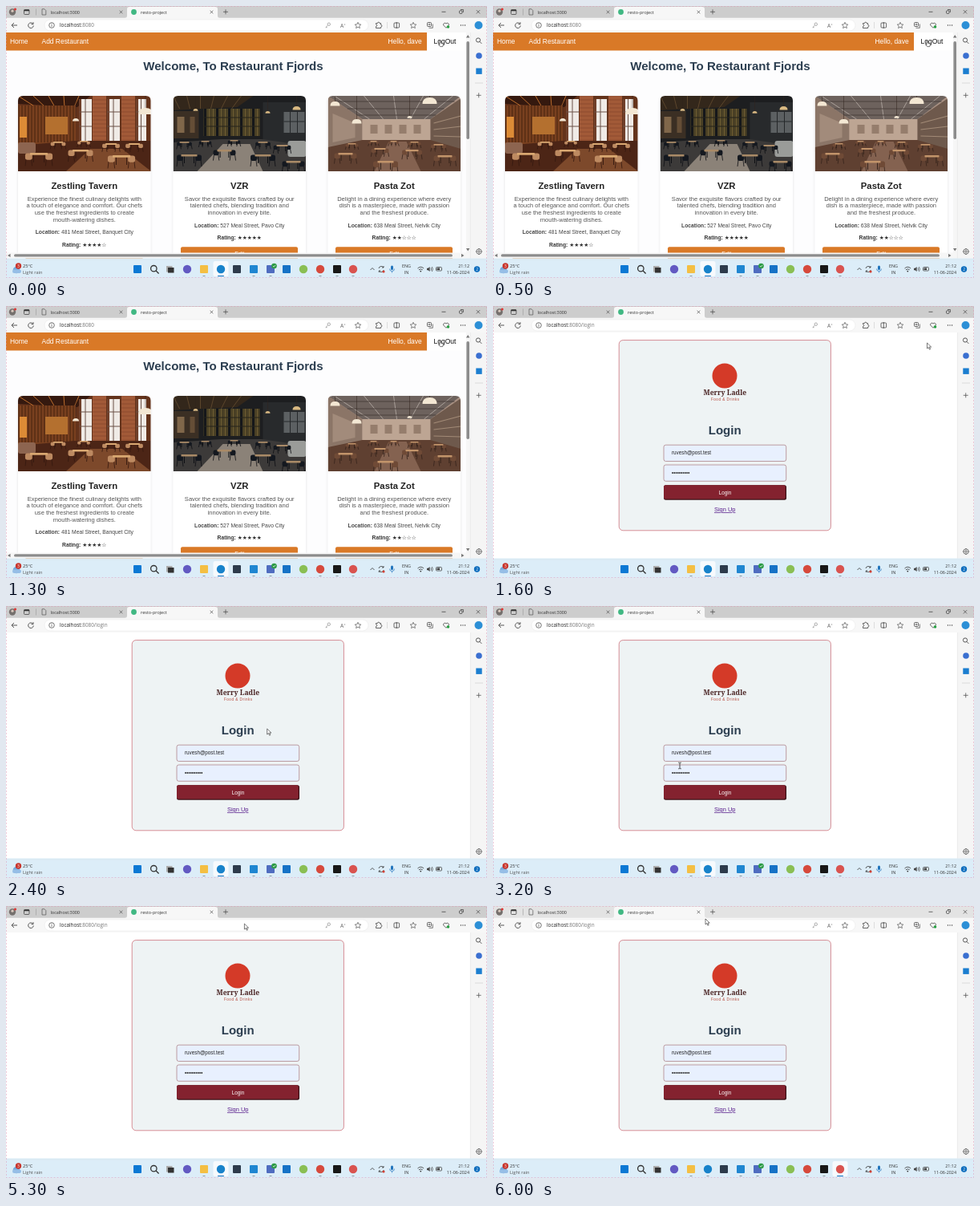
These frames come from a looping animation (600 by 339 pixels, 6.1 s). An HTML page:

```html
<!DOCTYPE html>
<html lang="en">
<head>
<meta charset="utf-8">
<title>resto-project</title>
<style>
html, body { margin: 0; width: 100%; height: 100%; overflow: hidden; background: #fff; }
svg { display: block; width: 600px; height: 339px; }
text { font-family: "Liberation Sans", Arial, sans-serif; white-space: pre; }
.ui text { font-family: "Open Sans", "Noto Sans", sans-serif; }
.star { font-family: "DejaVu Sans", sans-serif; }
.serif { font-family: "Noto Serif", serif !important; }
</style>
</head>
<body>
<svg id="stage" viewBox="0 0 600 339"></svg>
<script>
const LOOP = 6100, LOGOUT = 1500, BLUR = 5800;

const rect = (x, y, w, h, fill, more = '') => `<rect x="${x}" y="${y}" width="${w}" height="${h}" fill="${fill}" ${more}/>`;
const circle = (x, y, r, fill, more = '') => `<circle cx="${x}" cy="${y}" r="${r}" fill="${fill}" ${more}/>`;
const line = (d, color = '#444', w = 0.8, more = '') => `<path d="${d}" fill="none" stroke="${color}" stroke-width="${w}" ${more}/>`;
const shape = (d, fill, more = '') => `<path d="${d}" fill="${fill}" ${more}/>`;
const text = (x, y, size, str, fill = '#333', more = '') => `<text x="${x}" y="${y}" font-size="${size}" fill="${fill}" ${more}>${str}</text>`;
const group = (body, more = '') => `<g ${more}>${body}</g>`;
const each = (list, fn) => list.map(fn).join('');
const range = n => [...Array(n).keys()];
const MID = 'text-anchor="middle" ', BOLD = 'font-weight="700" ', END = 'text-anchor="end"';

// Tables at [x, y, size], each with a chair on both sides
const tables = (spots, top, seat, leg) => each(spots, ([x, y, s]) =>
  line(`M${x - s * 0.6} ${y}v${s}M${x + s * 0.6} ${y}v${s}`, leg, 1)
  + each([-1.15, 1.15], k => line(`M${x + k * s - s * 0.3} ${y + s * 0.6}l-1 ${s * 0.8}M${x + k * s + s * 0.3} ${y + s * 0.6}l1 ${s * 0.8}`, leg, 0.8)
    + rect(x + k * s - s * 0.4, y - s * 0.05, s * 0.8, s * 0.75, seat, `rx="${s * 0.25}"`))
  + rect(x - s, y - 1, s * 2, s * 0.2 + 0.6, top, 'rx=".6"'));

const lamp = (x, y, w, fill = '#f3e7d3') =>
  line(`M${x} 0V${y}`, '#30231c', 0.5) + shape(`M${x - w} ${y + w * 0.9}Q${x - w} ${y} ${x} ${y}T${x + w} ${y + w * 0.9}z`, fill);

const bistro = rect(0, 0, 166, 94, '#64331b')
  + shape('M0 0H90L74 14L0 10z', '#35190f')
  + each(range(5), i => line(`M${i * 19} 0L${22 + i * 12} 14`, '#bd6d2c', 1))
  + rect(0, 12, 72, 48, '#79401f')
  + each(range(18), i => line(`M${1 + i * 4} 12v46`, '#47220f', 1))
  + rect(2, 26, 9, 26, '#dc8b36') + rect(34, 26, 28, 22, '#b4702f')
  + each([[76, 16], [111, 16], [147, 13]], ([x, w]) => rect(x, 4, w, 56, '#f0ebe6')
    + rect(x, 4, 3, 58, '#70402a') + line(`M${x + w / 2} 4v56M${x} 20h${w}M${x} 38h${w}`, '#6a5146', 1))
  + each([[93, 17], [129, 17]], ([x, w]) => rect(x, 0, w, 62, '#a25a38')
    + each(range(12), i => line(`M${x} ${i * 5}h${w}`, '#7d4229', 0.6)))
  + shape('M0 62L70 56H166V94H0z', '#4c2516') + shape('M60 94L90 66H130L166 94z', '#7d492b')
  + rect(0, 58, 22, 14, '#8d6550', 'rx="3"')
  + tables([[50, 58, 6], [82, 57, 5], [116, 60, 7], [145, 60, 7], [26, 72, 11], [78, 68, 10], [129, 75, 11]], '#d9a871', '#bd8a61', '#341910')
  + lamp(159, 15, 9) + lamp(72, 28, 4);

const lounge = rect(0, 0, 166, 94, '#1d1e20')
  + shape('M0 0H100L80 14L0 18z', '#33271b')
  + each(range(6), i => line(`M${i * 17} 0L${8 + i * 13} 16`, '#6e5433', 0.7))
  + rect(0, 19, 32, 34, '#3b2f24') + rect(5, 26, 9, 20, '#80674a') + rect(21, 26, 6, 20, '#654e36')
  + rect(38, 16, 70, 34, '#4a4025')
  + each(range(14), i => line(`M${40 + i * 5} 16v34`, i % 3 ? '#796638' : '#15171a', i % 3 ? 0.8 : 3))
  + line('M38 27h70M38 38h70', '#25231b', 1)
  + rect(112, 8, 54, 50, '#282a2c') + rect(138, 20, 26, 26, '#5c6062') + line('M146 20v26M155 20v26M138 32h26', '#25282a', 1)
  + shape('M0 58L60 54H110L166 62V94H0z', '#3c3a39') + shape('M30 94L62 60H96L112 94z', '#8b8278')
  + rect(143, 56, 23, 20, '#9a9c99', 'rx="3"')
  + tables([[14, 58, 6], [40, 57, 5], [76, 56, 5], [112, 58, 6], [136, 62, 7], [20, 74, 10], [64, 68, 9], [112, 74, 10], [150, 82, 9]], '#a98a67', '#14181f', '#0d0f13')
  + lamp(154, 13, 5, '#d9b982') + lamp(118, 19, 3, '#d9b982') + lamp(28, 16, 3, '#d9b982');

const loft = rect(0, 0, 166, 94, '#a99183')
  + shape('M0 0H166L128 29H43z', '#6d625d')
  + each(range(5), i => line(`M${8 + i * 37} 0L${52 + i * 17} 29`, '#aaa099', 1))
  + line('M8 7H158M24 16H145M35 24H135', '#4a413d', 1)
  + shape('M0 0L43 29V58L0 70z', '#8b7567') + shape('M6 22L34 34V52L6 58z', '#a28b7b')
  + rect(43, 29, 85, 29, '#bda593')
  + shape('M166 3L128 29V58L166 72z', '#6e594c')
  + each(range(3), i => line(`M132 ${34 + i * 8}L166 ${25 + i * 13}`, '#a28a76', 1.2))
  + each(range(4), i => rect(53 + i * 18, 36, 9, 11, '#957d6c'))
  + shape('M0 64L43 55H128L166 66V94H0z', '#5f4031') + shape('M58 94L76 57H98L116 94z', '#846250')
  + tables([[30, 60, 5], [57, 57, 4], [82, 57, 4], [108, 58, 5], [138, 61, 6], [22, 72, 9], [65, 66, 7], [105, 68, 8], [146, 75, 9], [72, 82, 10]], '#c2946a', '#6f4a36', '#35231b')
  + lamp(9, 7, 6) + lamp(36, 29, 6) + lamp(127, 2, 9) + lamp(102, 25, 3);

const cards = [
  { x: 15, name: 'Zestling Tavern', photo: bistro, stars: '★★★★☆', place: '481 Meal Street, Banquet City',
    lines: ['Experience the finest culinary delights with', 'a touch of elegance and comfort. Our chefs', 'use the freshest ingredients to create', 'mouth-watering dishes.'] },
  { x: 208.5, name: 'VZR', photo: lounge, stars: '★★★★★', place: '527 Meal Street, Pavo City',
    lines: ['Savor the exquisite flavors crafted by our', 'talented chefs, blending tradition and', 'innovation in every bite.'] },
  { x: 401.5, name: 'Pasta Zot', photo: loft, stars: '★★☆☆☆', place: '638 Meal Street, Nelvik City',
    lines: ['Delight in a dining experience where every', 'dish is a masterpiece, made with passion', 'and the freshest produce.'] },
];

function card({ x, name, photo, stars, place, lines }) {
  const cx = x + 82.75, end = 242.6 + lines.length * 8.65;
  return rect(x, 112, 165.5, 220, '#fff', 'rx="6" filter="url(#shadow)"')
    + group(group(photo, 'filter="url(#soft)"'), `transform="translate(${x} 112)" clip-path="url(#photo)"`)
    + text(cx, 227.7, 11.3, name, '#222', MID + BOLD)
    + each(lines, (s, i) => text(cx, 242.6 + i * 8.65, 7.55, s, '#555', MID))
    + text(cx, end + 7, 6.74, `<tspan ${BOLD}>Location:</tspan> ${place}`, '#444', MID)
    + text(cx, end + 22.6, 6.74, `<tspan ${BOLD}>Rating:</tspan> <tspan class="star">${stars}</tspan>`, '#333', MID)
    + rect(x + 9.5, end + 31.8, 146, 16, '#d97927', 'rx="2"')
    + text(cx, end + 42.5, 7, 'Edit', '#fff', MID);
}

const home = rect(0, 33, 579, 283, '#fdfdfe')
  + text(283.5, 79.7, 15.05, 'Welcome, To Restaurant Fjords', '#2c3e50', MID + BOLD)
  + each(cards, card)
  + rect(0, 33, 525, 22.5, '#d97927') + rect(525, 33, 49, 22.5, '#fff')
  + text(5, 47.2, 8.45, 'Home', '#fff') + text(44.5, 47.2, 8.45, 'Add Restaurant', '#fff')
  + text(476.5, 47.2, 8.45, 'Hello, dave', '#fff') + text(533.5, 47.2, 8.5, 'LogOut', '#111')
  + rect(574, 33, 5, 283, '#f6f6f6') + rect(574.4, 44, 3.6, 122, '#8c8c8c', 'rx="1.8"')
  + rect(0, 307.5, 579, 7, '#f6f6f6') + rect(10, 309.2, 547, 3.4, '#8c8c8c', 'rx="1.7"')
  + shape('M574 39.5l2.2-3.5 2.2 3.5zM5.5 308.7v4.4l-3.5-2.2zM568 308.7v4.4l3.5-2.2zM574 302h4.4l-2.2 3.5z', '#777');

const field = y => rect(213, y, 152.7, 20.3, '#e8f0fe', 'rx="2.5" stroke="#a8777b" stroke-width=".7"');
const login = rect(0, 33, 579, 283, '#fff')
  + rect(157.2, 42.6, 264.2, 237.2, '#eef3f4', 'rx="5" stroke="#c9606c" stroke-width=".7"')
  + circle(289, 87, 15.5, '#d43a28')
  + text(289.3, 111.3, 8.6, 'Merry Ladle', '#4a2424', MID + BOLD + 'class="serif"')
  + text(289.8, 117.8, 4.6, 'Food &amp; Drinks', '#b5493c', MID + 'letter-spacing=".5"')
  + text(289.2, 159.6, 15, 'Login', '#2c3e50', MID + BOLD)
  + field(173.2) + field(198)
  + text(223, 185.3, 6.3, 'ruvesh@post.test', '#222')
  + each(range(10), i => circle(224 + i * 2.25, 208, 0.9, '#222'))
  + rect(213, 223.3, 153, 18.4, '#3c1017', 'rx="2.5"') + rect(213, 223.3, 151.8, 17.2, '#84222f', 'rx="2.2"')
  + text(289.5, 234.8, 6.3, 'Login', '#fff', MID)
  + text(289.2, 256.3, 7.45, 'Sign Up', '#551a8b', MID + 'text-decoration="underline"');

const cross = (x, y, r = 1.8) => line(`M${x - r} ${y - r}l${2 * r} ${2 * r}m0 ${-2 * r}l${-2 * r} ${2 * r}`, '#444', 0.7);
const plus = (x, y) => line(`M${x - 3} ${y}h6m-3-3v6`, '#444', 0.7);
const ring = (x, y, r) => circle(x, y, r, 'none', 'stroke="#555" stroke-width=".8"');
const box = (x, y, w, h) => rect(x, y, w, h, 'none', 'rx="1" stroke="#444" stroke-width=".8"');
const star = (x, y) => line(`M${x} ${y - 3.7}l1.1 2.5 2.7.3-2 1.8.6 2.7-2.4-1.4-2.4 1.4.6-2.7-2-1.8 2.7-.3z`, '#555', 0.7);
const magnifier = (x, y, r, w = 1) => circle(x, y, r, 'none', `stroke="#333" stroke-width="${w}"`) + line(`M${x + r * 0.7} ${y + r * 0.7}l${r} ${r}`, '#333', w);
const page = line('M45 3.8h3l1.8 1.8v5.4H45z', '#555', 0.7);

const chrome = rect(0, 0, 600, 15.5, '#cdcdcd', 'id="tabs"')
  + rect(0, 14.8, 600, 18.2, '#f7f7f7')
  + shape('M148 15Q151 15 151 12V4Q151 1 154 1H261Q264 1 264 4V12Q264 15 267 15z', '#f7f7f7')
  + circle(8, 7.5, 4.2, '#75706d') + circle(8, 6.2, 1.6, '#d8c8bd') + circle(11.5, 4, 1.6, '#d93a3a')
  + box(22.5, 4.5, 6.5, 6) + line('M22.5 5.5h6.5', '#333', 1.6) + line('M37.5 3.5v8', '#999', 0.6)
  + page + text(55.5, 9.6, 5.42, 'localhost:3000') + cross(143.5, 7.5)
  + circle(159.5, 7.5, 3.4, '#41b883') + text(168, 9.6, 5.5, 'resto-project') + cross(256.5, 7.5) + plus(274, 7.3)
  + line('M543.5 7.3h5', '#333', 0.7) + box(565.5, 5.8, 3.6, 3.6) + line('M567 4.5h3.4v3.4', '#333', 0.7) + cross(589, 7.3, 2.2)
  + line('M14 24H7m3-3l-3 3 3 3M33.7 22.3a3.3 3.3 0 1 0 .6 2.2M34 20.2v2.5h-2.5', '#444', 0.9)
  + rect(48, 17, 404, 14, '#fff', 'rx="7" stroke="#e4e4e4" stroke-width=".5"')
  + ring(57, 24, 3.3) + line('M57 23.4v2.3M57 21.8v.8', '#555', 0.8)
  + text(67, 26.3, 6.35, 'localhost<tspan fill="#777">:8080<tspan id="path"></tspan></tspan>', '#222')
  + circle(402.8, 22.7, 1.7, 'none', 'stroke="#888" stroke-width=".7"') + line('M401.5 24l-2.7 2.7h1.8', '#888', 0.7)
  + text(417, 26.6, 6.6, 'A', '#666') + text(421.5, 23.5, 4, '»', '#666') + star(439, 24)
  + line('M461.5 21.5h2a1.3 1.3 0 0 1 2.6 0h1.5v2a1.3 1.3 0 0 1 0 2.6v1.4h-6.1v-2a1.3 1.3 0 0 0 0-2.6z', '#444')
  + line('M475.5 20v8', '#ccc', 0.6)
  + box(484, 21, 6.6, 6) + line('M487.3 20v8') + star(508, 24)
  + box(525.5, 20.5, 5, 5) + line('M527.5 27.3h4.8v-4.8M528 21.7v2.6m-1.3-1.3h2.6', '#444', 0.7)
  + line('M549 27.3l-3-3a1.8 1.8 0 0 1 3-2.3 1.8 1.8 0 0 1 3 2.3z', '#444') + circle(551.5, 26, 1.8, '#27a243')
  + each([567.4, 570, 572.6], x => circle(x, 24, 0.65, '#333'));

const sidebar = rect(579, 33, 21, 283, '#f5f5f5') + line('M579.3 33V316', '#e2e2e2', 0.6)
  + circle(589.5, 24, 5, '#2c8fd6')
  + magnifier(589, 42.5, 2.6, 0.8) + circle(590, 62, 3.8, '#3a6fd0') + rect(586.3, 77.5, 7.4, 7.4, '#1b7ed0')
  + line('M585 96h10', '#ccc', 0.6) + plus(589.7, 111.3)
  + ring(590, 306, 1.3) + ring(590, 306, 3.2) + line('M590 302v1m0 6v1m-4-4h1m6 0h1', '#555', 1.2);

const apps = [
  [164, '#0a78d4', 1], [226, '#6259c2', 0], [247, '#f4bf43', 1], [268, '#1782ca', 0], [288, '#2d3b4c', 1],
  [309, '#1f86d1', 1], [330, '#4f6cc0', 1], [350, '#1672c6', 1], [371, '#8abf54', 0], [392, '#d6493c', 0],
  [413, '#171717', 1], [433, '#d9534f', 0],
];
const taskbar = rect(0, 314.5, 600, 25, '#dcedf8') + line('M0 316H600', '#d0dce6', 0.5)
  + circle(13, 329, 4.3, '#76a9dc') + rect(8, 328.5, 11, 4.6, '#96bee6', 'rx="2.3"')
  + circle(15.5, 324, 3.7, '#c9352c') + text(15.5, 326, 5, '3', '#fff', MID)
  + text(21, 326.3, 5.6, '25°C') + text(21, 334.4, 5.6, 'Light rain', '#555')
  + rect(0, 318, 19, 19, '#f6fafd', 'rx="2.5" id="focus"')
  + magnifier(184.3, 327.2, 3.7, 1.3) + rect(200, 324, 7.5, 7.5, '#aaa') + rect(202, 326, 7.5, 6.5, '#333')
  + each(apps, ([x, fill, square]) => square ? rect(x - 5, 323, 10, 10, fill, 'rx="1"') : circle(x, 328, 5.2, fill))
  + circle(334.5, 324, 3.3, '#2c9b46') + line('M333 324l1.2 1.2 2-2.4', '#fff', 0.7)
  + each([247, 268, 309, 330, 392, 413, 433], x => rect(x - 1.6, 336, 3.2, 1, '#8b959d', 'rx=".5"'))
  + rect(0, 336, 8, 1.1, '#0a6cbd', 'rx=".5" id="mark"')
  + line('M454.5 329l2.5-2.5 2.5 2.5', '#333')
  + line('M465 327a3.3 3.3 0 0 1 6-1m0-2v2h-2M471.3 329a3.3 3.3 0 0 1-6 1m0 2v-2h2', '#333') + circle(471, 331, 1.6, '#d14135')
  + rect(480, 323.5, 3, 5.5, '#2275bd', 'rx="1.5"') + line('M478.5 327.5a3 3 0 0 0 6 0M481.5 330.5v2', '#2275bd', 0.7)
  + text(499.5, 326.3, 5.5, 'ENG', '#333', MID) + text(499.5, 334.4, 5.5, 'IN', '#333', MID)
  + line('M513.5 327q3.8-3.5 7.6 0M514.9 328.8q2.4-2 4.8 0', '#333', 0.8) + circle(517.3, 330.6, 0.9, '#333')
  + shape('M525 326.8h1.6l2-1.8v6l-2-1.8H525z', '#444') + line('M530 326.2q1.2 1.8 0 3.6M531.4 325q2 3 0 6', '#444', 0.7)
  + box(536.5, 325.5, 7, 4.5) + rect(537.5, 326.5, 3.6, 2.5, '#444')
  + text(578, 326.3, 5.4, '21:12', '#333', END) + text(578, 334.4, 5.4, '11-06-2024', '#333', END)
  + circle(587.5, 328, 3.7, '#0b6cbd') + text(587.5, 329.8, 4.8, '2', '#fff', MID);

const outline = 'stroke="#222" stroke-width=".6" stroke-linejoin="round"';
const pointers = {
  hand: shape('M-.7 2.6V-2.4q0-.8 .7-.8t.7 .8V.2l2.5.6q.8 .3.7 1.1L3.3 4.6H.2L-2.2 1.8q.5-.8 1.5 .1z', '#fff', outline),
  arrow: shape('M0 0V7l1.7-1.5 1.2 2.7 1.2-.5-1.2-2.6H5.2z', '#fff', outline),
  beam: line('M-1.8-3.8h1.3l.5.5.5-.5h1.3M0-3.3V3.3M-1.8 3.8h1.3l.5-.5.5.5h1.3', '#222', 0.8),
};

const stage = document.getElementById('stage');
stage.innerHTML = `<defs><clipPath id="photo"><path d="M0 94V6Q0 0 6 0H159.5Q165.5 0 165.5 6V94z"/></clipPath>
  <filter id="soft" x="0" y="0" width="1" height="1"><feGaussianBlur stdDeviation=".5"/></filter>
  <filter id="shadow"><feDropShadow dx="0" dy="1" stdDeviation="1.8" flood-opacity=".12"/></filter></defs>`
  + group(home, 'id="home"') + group(login, 'id="login"')
  + group(chrome + sidebar + taskbar, 'class="ui"')
  + rect(0.3, 0.3, 599.4, 338.4, 'none', 'stroke="#e08fb0" stroke-width=".6" stroke-dasharray="2 2"')
  + each(Object.entries(pointers), ([id, body]) => group(body, `id="${id}"`));

const el = id => document.getElementById(id);
const show = (id, on) => el(id).setAttribute('display', on ? 'inline' : 'none');

// Pointer stops: time, x, y
const stops = [[0, 541.5, 46], [1700, 541.5, 46], [2800, 233, 199], [3500, 233, 199], [4400, 340, 30], [4700, 340, 30], [5800, 265, 16], [LOOP, 265, 16]];

function pointerAt(t) {
  const i = stops.findIndex(s => s[0] > t);
  const [t0, x0, y0] = stops[i - 1], [t1, x1, y1] = stops[i];
  const k = (t - t0) / (t1 - t0), e = k * k * (3 - 2 * k);
  return [x0 + (x1 - x0) * e, y0 + (y1 - y0) * e];
}

function draw(now) {
  const t = Math.floor((now % LOOP) / 100) * 100;
  const [x, y] = pointerAt(t), out = t >= LOGOUT, blurred = t >= BLUR;
  const inColumn = x > 213 && x < 366;
  const inField = inColumn && y > 173 && y < 218.5;
  const inButton = inColumn && y > 223 && y < 242;
  const kind = !out || inButton ? 'hand' : inField ? 'beam' : 'arrow';
  show('home', !out);
  show('login', out);
  el('path').textContent = out ? '/login' : '';
  for (const id in pointers) {
    show(id, id === kind);
    el(id).setAttribute('transform', `translate(${x} ${y})`);
  }
  const active = blurred ? 433 : 268;
  el('focus').setAttribute('x', active - 9.5);
  el('mark').setAttribute('x', active - 4);
  el('tabs').setAttribute('fill', blurred ? '#e3e3e3' : '#cdcdcd');
  requestAnimationFrame(() => draw(performance.now() - start));
}
const start = performance.now();
draw(0);
</script>
</body>
</html>
```
